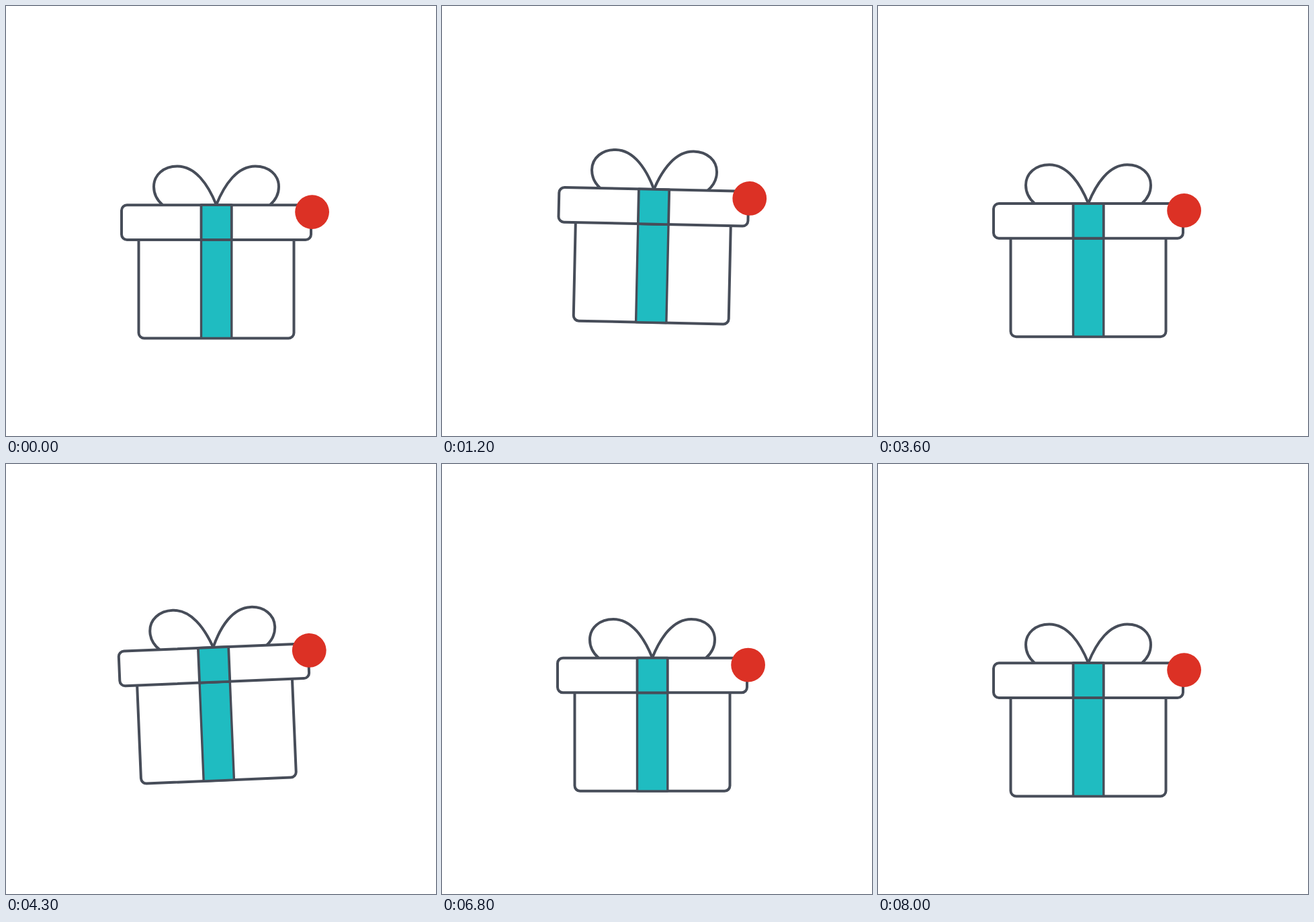
These frames come from a looping animation (640 by 640 pixels, 9.4 s). An HTML page:

```html
<!DOCTYPE html>
<html lang="en">
<head>
<meta charset="utf-8">
<title>Gift box</title>
<style>
  html, body { margin: 0; width: 100%; height: 100%; overflow: hidden; background: #fff; }
  svg { display: block; width: 100%; height: 100%; }
</style>
</head>
<body>
<svg viewBox="0 0 640 640">
  <g id="gift" fill="#fff" stroke="#474d59" stroke-width="4" stroke-linejoin="round">
    <g fill="none">
      <path id="loop" d="M233 296C225 289 220 279 220 269C220 251 235 238.5 255 238.5C282 238.5 301 266 313 296"/>
      <use href="#loop" transform="matrix(-1 0 0 1 626 0)"/>
    </g>
    <rect x="197.5" y="340" width="231" height="154.4" rx="8"/>
    <rect x="290.5" y="348" width="45.3" height="146.4" fill="#1fbcc1" stroke-width="3.4"/>
    <rect x="172" y="296.2" width="282" height="51.7" rx="8"/>
    <rect x="290.5" y="296.2" width="45.3" height="51.7" fill="#1fbcc1" stroke-width="3.8"/>
    <circle cx="455.6" cy="306.6" r="25.4" fill="#dc3125" stroke="none"/>
  </g>
</svg>
<script>
  const LOOP = 9400, STEP = 100, FIRST = 400, PERIOD = 3162;
  const gift = document.getElementById('gift');

  // [time in ms since the hop began, value]
  const lift = [[0, 0], [200, -23.3], [975, -23.3], [1195, 0]];
  const tilt = [[85, 0], [248, 8.7], [412, -4], [574, 8.3], [737, -2.4], [885, 7], [1035, 0]];

  // Eases smoothly from key to key and holds outside them.
  function valueAt(keys, t) {
    const next = keys.findIndex(key => key[0] > t);
    if (next === 0) return keys[0][1];
    if (next < 0) return keys[keys.length - 1][1];
    const [t0, v0] = keys[next - 1], [t1, v1] = keys[next];
    const u = (t - t0) / (t1 - t0);
    return v0 + (v1 - v0) * u * u * (3 - 2 * u);
  }

  const start = performance.now();

  function draw(now) {
    const elapsed = Math.max(0, now - start) % LOOP;
    const time = Math.floor(elapsed / STEP) * STEP - FIRST;
    const t = time < 0 ? 0 : time % PERIOD;
    gift.setAttribute('transform',
      `translate(0 ${valueAt(lift, t)}) rotate(${valueAt(tilt, t)} 313 407)`);
    requestAnimationFrame(draw);
  }
  draw(start);
</script>
</body>
</html>
```
